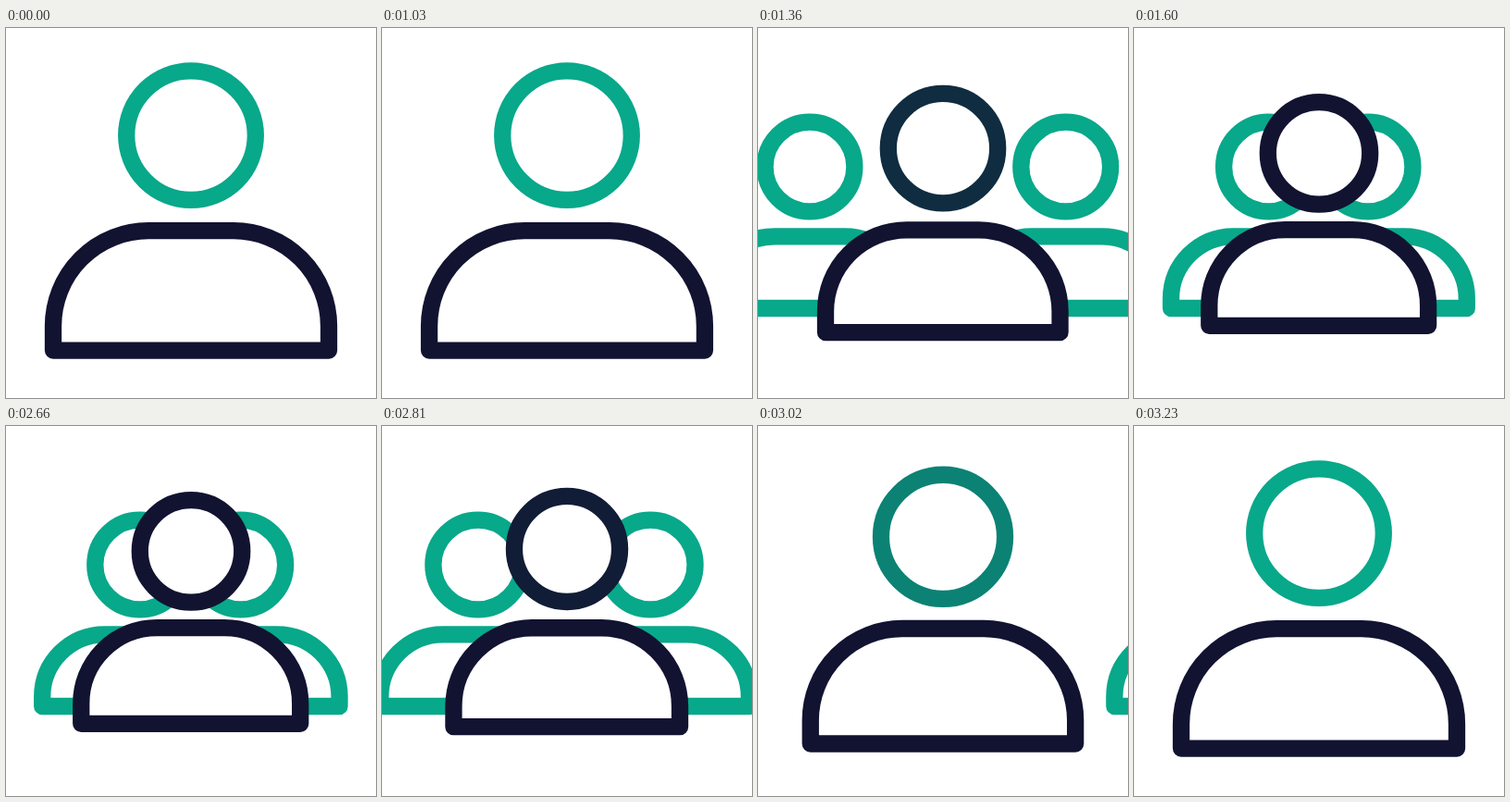
Write an HTML page that moves like this. It is 400x400 px and loops after 3260 ms.

```html
<!DOCTYPE html>
<html lang="en">
<head>
<meta charset="utf-8">
<title>One person becomes a group</title>
<style>
  html, body { margin: 0; width: 100%; height: 100%; overflow: hidden; background: #fff; }
  svg { display: block; width: 100%; height: 100%; }
  svg * { fill: #fff; stroke: #08a88a; stroke-width: 18.3; stroke-linejoin: round; }
  #frontBody { stroke: #121331; }
</style>
</head>
<body>
<svg viewBox="0 0 400 400">
  <g id="left"><circle cy="150" r="48.4"/><path/></g>
  <g id="right"><circle cy="150" r="48.4"/><path/></g>
  <path id="frontBody"/>
  <circle id="frontHead" cx="200"/>
</svg>
<script>
const LOOP = 3260, STEP = 30, STEPS = 20;
const GROW = 1000, SHRINK = 2630;
const TEAL = [8, 168, 138], NAVY = [18, 19, 49];

const $ = id => document.getElementById(id);
const mix = (a, b, p) => a + (b - a) * p;
const clamp = (v, max) => Math.max(0, Math.min(max, v));

// cubic-bezier(.6, 0, .4, 1)
function ease(x) {
  let low = 0, high = 1;
  for (let i = 0; i < 30; i++) {
    const s = (low + high) / 2;
    if (1.8 * s - 2.4 * s * s + 1.6 * s ** 3 < x) low = s; else high = s;
  }
  return low * low * (3 - 2 * low);
}

function torso(cx, half, top, bottom, r) {
  const l = cx - half, e = cx + half;
  return `M${l} ${bottom}V${top + r}A${r} ${r} 0 0 1 ${l + r} ${top}` +
    `H${e - r}A${r} ${r} 0 0 1 ${e} ${top + r}V${bottom}Z`;
}

function setUpSide(id, headX, bodyX) {
  const [head, body] = $(id).children;
  head.setAttribute('cx', headX);
  body.setAttribute('d', torso(bodyX, 105.5, 225.3, 303, 67.5));
}

const slide = (id, dx) => $(id).setAttribute('transform', `translate(${dx} 0)`);

function draw(time) {
  const t = time % LOOP;
  const stepsSince = start => clamp(Math.floor((t - start) / STEP), STEPS);
  const step = stepsSince(GROW) - stepsSince(SHRINK);
  const p = ease(step / STEPS);
  const tint = ease(clamp(step / 18, 1));

  slide('left', mix(-328, 0, p));
  slide('right', mix(292, 0, p));
  $('frontBody').setAttribute('d', torso(mix(200, 199.7, p), mix(149, 118.4, p),
    mix(219.2, 218.1, p), mix(348.6, 321.8, p), mix(103, 82, p)));
  $('frontHead').setAttribute('cy', mix(116.1, 135.4, p));
  $('frontHead').setAttribute('r', mix(69.8, 55.2, p));
  $('frontHead').style.stroke =
    `rgb(${TEAL.map((c, i) => Math.round(mix(c, NAVY[i], tint)))})`;
}

setUpSide('left', 145.5, 145.5);
setUpSide('right', 253, 254.3);

const begin = performance.now();
function tick() {
  draw(performance.now() - begin);
  requestAnimationFrame(tick);
}
tick();
</script>
</body>
</html>
```
